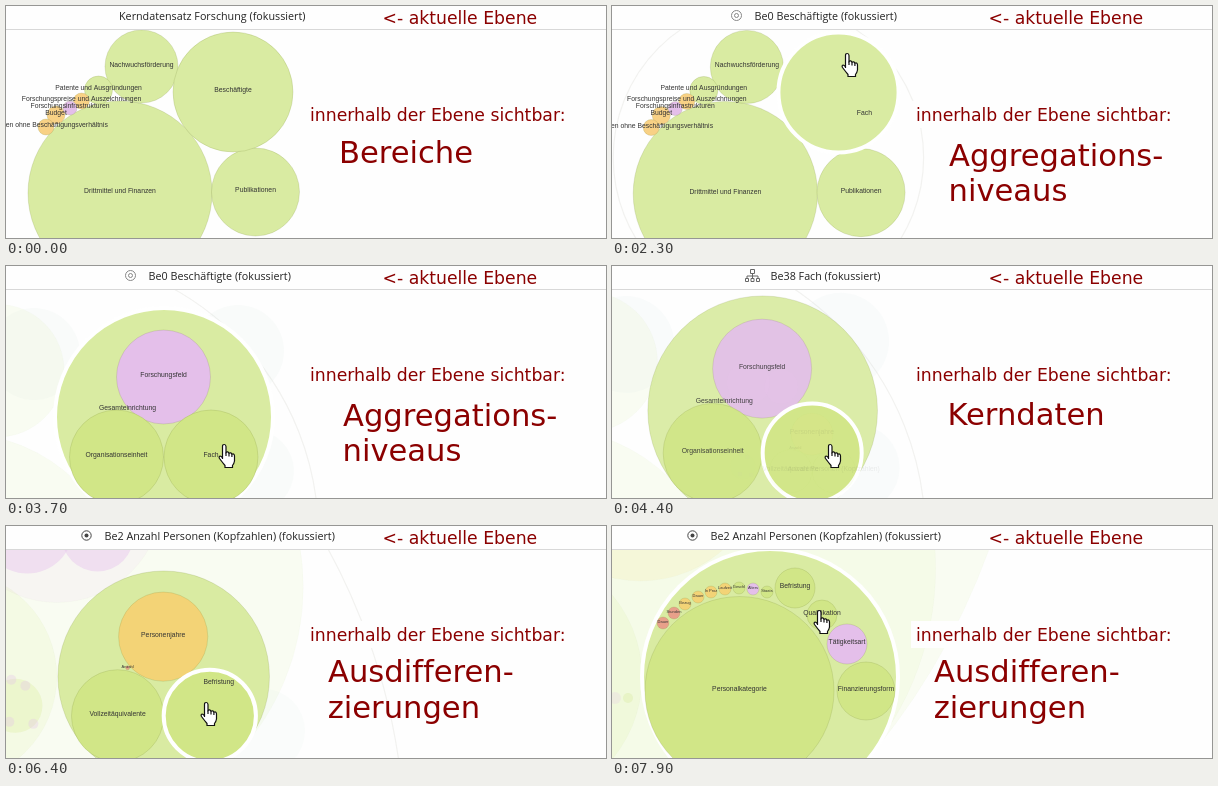
Write an HTML page with a canvas that moves like this. It is 600 px wide and 232 px high and loops after 8000 ms.

```html
<!DOCTYPE html>
<html lang="de">
<head>
<meta charset="utf-8">
<title>Kerndatensatz Forschung</title>
<style>
html, body { margin: 0; width: 100%; height: 100%; overflow: hidden; background: #fefefe; }
canvas { display: block; }
</style>
</head>
<body>
<canvas id="stage" width="600" height="232"></canvas>
<script>
const ctx = document.getElementById('stage').getContext('2d');
const LOOP = 8000, STEP = 100;
const CENTER = { x: 158, y: 151 }, DIAMETER = 310;
const GREEN = '#d9eba2', LEAF = '#d1e687', ORANGE = '#f8d185', AMBER = '#f3d376',
      LILAC = '#e4bfea', RED = '#e8a08a', MIST = '#b9d5cf';

const scenes = [
  { start: 0, end: 0, title: 'Kerndatensatz Forschung (fokussiert)', titleX: 113,
    words: [['Bereiche', 333, 157]] },
  { start: 2200, end: 3100, shown: 2300, title: 'Be0 Beschäftigte (fokussiert)', titleX: 142.5,
    words: [['Aggregations-', 337, 160], ['niveaus', 336.5, 195]] },
  { start: 4250, end: 4800, shown: 4300, title: 'Be38 Fach (fokussiert)', titleX: 158.5,
    words: [['Kerndaten', 335.5, 159]] },
  { start: 6350, end: 6900, shown: 6400, title: 'Be2 Anzahl Personen (Kopfzahlen) (fokussiert)', titleX: 98.5,
    words: [['Ausdifferen-', 322, 156], ['zierungen', 321.7, 192]] }
];

// Each view has its centre in world units and its magnification.
const views = [{ ...CENTER, k: 1 }];
const nodes = [];

// Positions are given as seen in the view of the node's parent.
function add(depth, x, y, r, color, label = '', options = {}) {
  const view = views[options.ghost ? depth : depth - 1];
  const node = {
    depth, color, label, size: 6.8, fade: .13, ...options,
    x: (x - CENTER.x) / view.k + view.x,
    y: (y - CENTER.y) / view.k + view.y,
    r: r / view.k
  };
  nodes.push(node);
  return node;
}

function addFocus(depth, x, y, r, color, label, zoomedRadius, options) {
  const node = add(depth, x, y, r, color, label, { ...options, focus: true });
  views[depth] = { x: node.x, y: node.y, k: zoomedRadius / node.r };
}

// Pale leftovers that belong to one scene only.
const ghost = (scene, x, y, r, color, fade) => add(scene, x, y, r, color, '', { ghost: true, fade });

add(1, 114, 187, 92, GREEN, 'Drittmittel und Finanzen');
add(1, 135.5, 60.5, 36.5, GREEN, 'Nachwuchsförderung');
add(1, 249.5, 186, 44, GREEN, 'Publikationen');
add(1, 92.5, 84, 14, GREEN, 'Patente und Ausgründungen');
add(1, 75.5, 95, 8, ORANGE, 'Forschungspreise und Auszeichnungen');
add(1, 50, 109, 9, ORANGE, 'Budget');
add(1, 64, 102, 7, LILAC, 'Forschungsinfrastrukturen');
add(1, 40, 121, 8, ORANGE, 'Personen ohne Beschäftigungsverhältnis');
addFocus(1, 227, 86, 60, GREEN, 'Beschäftigte', 109);

add(2, 157.5, 111, 47, LILAC, 'Forschungsfeld');
add(2, 110.5, 191, 47, LEAF, 'Organisationseinheit');
add(2, 121.5, 144, 0, GREEN, 'Gesamteinrichtung');
addFocus(2, 205, 191, 47, LEAF, 'Fach', 105.5, { early: true });

add(3, 157.5, 111, 44.5, AMBER, 'Personenjahre');
add(3, 112, 190, 46, LEAF, 'Vollzeitäquivalente');
add(3, 122, 142, 2, RED, 'Anzahl', { size: 4 });
addFocus(3, 204, 190, 46, LEAF, 'Anzahl Personen (Kopfzahlen)', 128);

add(4, 127.5, 165, 94.5, LEAF, 'Personalkategorie');
add(4, 183, 62, 20, LEAF, 'Befristung', { early: true });
add(4, 210, 89, 15, LEAF, 'Qualifikation');
add(4, 235, 118, 20, LILAC, 'Tätigkeitsart');
add(4, 254, 165, 29, LEAF, 'Finanzierungsform');
[[51, 96, RED, 'Dauer'], [62, 86, RED, 'Stunden'], [73, 77, AMBER, 'Bezug'],
 [86, 70, AMBER, 'Dauer'], [99, 65, AMBER, 'In Proz'], [113, 62, AMBER, 'Laufzeit'],
 [127, 61, LEAF, 'Geschl'], [141, 62, LILAC, 'Alters'], [155, 65, LEAF, 'Staats']
].forEach(([x, y, color, label]) => add(4, x, y + 1, 6, color, label, { size: 4 }));

ghost(1, 232, 85, 46, MIST, .08);
ghost(1, 28, 88, 46, MIST, .08);
ghost(1, 247, 205, 41, MIST, .08);
ghost(2, 257, 205, 42, MIST, .06);
ghost(2, 22, 2, 46, LILAC, .4);
ghost(2, 92, 10, 36, LILAC, .4);
ghost(2, 10, 180, 27, LEAF, .25);
[[6, 154], [20, 160], [4, 196], [28, 198]].forEach(([x, y]) => ghost(2, x, y, 5, LILAC, .3));
ghost(3, 3, 172, 6, LILAC, .22);
ghost(3, 16, 172, 5, LEAF, .25);

nodes.sort((a, b) => a.depth - b.depth || !!a.focus - !!b.focus);

const lerp = (a, b, u) => a + (b - a) * u;
const easeInOut = p => p < .5 ? 4 * p ** 3 : 1 - 4 * (1 - p) ** 3;

// Smooth zoom and pan after van Wijk and Nuij.
function zoomBetween(from, to, u) {
  const rho = Math.SQRT2, w0 = DIAMETER / from.k, w1 = DIAMETER / to.k;
  const dx = to.x - from.x, dy = to.y - from.y, d = Math.hypot(dx, dy);
  const angle = (w, sign) => -Math.asinh((w1 * w1 - w0 * w0 + sign * 4 * d * d) / (4 * w * d));
  const r0 = angle(w0, 1), r1 = angle(w1, -1);
  const r = lerp(r0, r1, u);
  const along = w0 / (rho * rho * d) * (Math.cosh(r0) * Math.tanh(r) - Math.sinh(r0));
  return { x: from.x + along * dx, y: from.y + along * dy,
           k: DIAMETER * Math.cosh(r) / (w0 * Math.cosh(r0)) };
}

function circleAlpha(node, scene) {
  if (node.ghost) return scene === node.depth ? node.fade : 0;
  if (node.depth > scene + 1) return 0;
  if (node.depth === scene + 1 || (node.focus && node.depth === scene)) return 1;
  return node.fade;
}

// An entered circle takes on the lighter green of a container.
function circleColor(node, scene, u) {
  if (!node.focus || node.depth > scene) return node.color;
  const share = node.depth < scene ? 100 : Math.round(u * 100);
  return `color-mix(in srgb, ${node.color}, ${GREEN} ${share}%)`;
}

function labelAlpha(node, scene, u) {
  if (node.focus && node.depth === scene) return 0;
  const now = node.depth === scene + 1, before = node.depth === scene;
  return now && node.early ? 1 : lerp(+before, +now, u);
}

function circle(x, y, r) {
  ctx.beginPath();
  ctx.arc(x, y, Math.max(r, 0), 0, 2 * Math.PI);
}

function text(string, x, y, font, color, align = 'left') {
  ctx.font = font;
  ctx.fillStyle = color;
  ctx.textAlign = align;
  ctx.fillText(string, x, y);
}

function drawBubbles(scene, u) {
  const view = scene ? zoomBetween(views[scene - 1], views[scene], u) : views[0];
  const toX = x => (x - view.x) * view.k + CENTER.x;
  const toY = y => (y - view.y) * view.k + CENTER.y;

  if (scene) {
    circle(toX(157), toY(CENTER.y), 155 * view.k);
    ctx.strokeStyle = '#f2f2f0';
    ctx.lineWidth = 1.2;
    ctx.stroke();
  }
  for (const node of nodes) {
    ctx.globalAlpha = lerp(circleAlpha(node, Math.max(scene - 1, 0)), circleAlpha(node, scene), u);
    if (!ctx.globalAlpha || !node.r) continue;
    const ringed = node.focus && node.depth === scene;
    circle(toX(node.x), toY(node.y), node.r * view.k);
    ctx.fillStyle = circleColor(node, scene, u);
    ctx.fill();
    if (node.ghost) continue;
    ctx.strokeStyle = ringed ? '#fff' : 'rgba(110,130,50,.22)';
    ctx.lineWidth = ringed ? 4 : .8;
    ctx.stroke();
  }
  for (const node of nodes) {
    ctx.globalAlpha = node.label ? labelAlpha(node, scene, u) : 0;
    if (ctx.globalAlpha)
      text(node.label, toX(node.x), toY(node.y), `${node.size}px "Liberation Sans", sans-serif`, '#333', 'center');
  }
  ctx.globalAlpha = 1;
}

function drawIcon(scene) {
  ctx.strokeStyle = ctx.fillStyle = '#444';
  ctx.lineWidth = 1;
  if (scene === 1) {
    ctx.strokeStyle = '#888';
    circle(124.5, 9.5, 5);
    ctx.stroke();
    circle(124.5, 9.5, 2);
    ctx.stroke();
  } else if (scene === 2) {
    ctx.strokeStyle = '#666';
    ctx.stroke(new Path2D('M138.5 3.5h4v4h-4z M133.5 12.5h3v3h-3z M139 12.5h3v3h-3z M144.5 12.5h3v3h-3z M140.5 7.5v5 M135 12.5v-2.5h11v2.5'));
  } else if (scene === 3) {
    circle(80.5, 9.5, 4.7);
    ctx.stroke();
    circle(80.5, 9.5, 2);
    ctx.fill();
  }
}

function drawTexts(scene) {
  const { title, titleX, words } = scenes[scene];
  const dejaVu = size => `${size}px "DejaVu Sans", sans-serif`, darkRed = '#8b0000';
  ctx.fillStyle = '#fefefe';
  ctx.fillRect(0, 0, 600, 23);
  ctx.fillRect(299, 95, 266, 27);
  ctx.fillStyle = '#d8d8d8';
  ctx.fillRect(0, 23, 600, 1);
  text(title, titleX, 14, '10.75px "Open Sans", sans-serif', '#222');
  drawIcon(scene);
  ctx.textRendering = 'optimizeSpeed'; // no ligatures
  text('<- aktuelle Ebene', 376.5, 18, dejaVu(17.25), darkRed);
  text('innerhalb der Ebene sichtbar:', 304, 115, dejaVu(17.25), darkRed);
  for (const [word, x, y] of words) text(word, x, y, dejaVu(30.6), darkRed);
  ctx.textRendering = 'auto';
}

// Time, left and top of the pointer.
const pointerPath = [
  [1000, 232, -25], [1800, 229, 47], [2300, 229, 47], [3000, 228, 97], [3100, 228, 97],
  [3700, 212, 178], [4900, 212, 178], [5000, 212, 177], [5100, 210, 171], [5200, 210, 171],
  [5800, 194, 176], [7200, 194, 176], [7500, 186, 140], [7900, 201, 84], [LOOP, 201, 84]
];
const hand = new Path2D('M4 15V2.5Q4 .5 5.7 .5T7.5 2.5V8.5Q9.2 7 10.5 9.3Q12.4 8 13.4 10.2Q16 9.2 16 12V17Q15.6 19.5 14 21.5V23.5H6.5V21.5Q4 18.5 1 14.5Q0 12.5 1.6 12Q2.8 12 4 14Z');
const knuckles = new Path2D('M7.5 8.5V12M10.5 9.3V12.5M13.4 10.2V13');

function drawPointer(t) {
  const next = pointerPath.findIndex(key => key[0] > t);
  if (next < 1) return;
  const [t0, x0, y0] = pointerPath[next - 1], [t1, x1, y1] = pointerPath[next];
  const u = (t - t0) / (t1 - t0);
  ctx.save();
  ctx.translate(lerp(x0, x1, u) + .5, lerp(y0, y1, u));
  ctx.fillStyle = '#fff';
  ctx.strokeStyle = '#111';
  ctx.lineWidth = 1.2;
  ctx.fill(hand);
  ctx.stroke(hand);
  ctx.stroke(knuckles);
  ctx.restore();
}

function draw(now) {
  const t = Math.floor(now % LOOP / STEP) * STEP;
  const scene = scenes.filter(s => t >= (s.shown || 0)).length - 1;
  const { start, end } = scenes[scene];
  const u = scene ? easeInOut(Math.min((t - start) / (end - start), 1)) : 1;
  ctx.fillStyle = '#fefefe';
  ctx.fillRect(0, 0, 600, 232);
  drawBubbles(scene, u);
  drawTexts(scene);
  drawPointer(t);
}

const origin = performance.now();
function tick() {
  draw(performance.now() - origin);
  requestAnimationFrame(tick);
}
tick();
</script>
</body>
</html>
```
